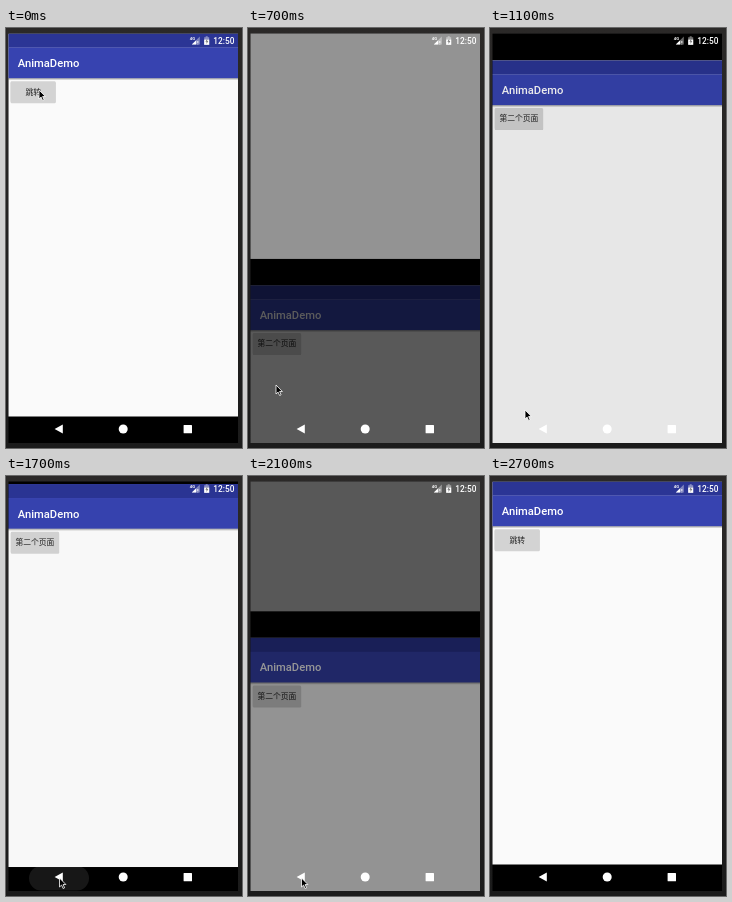
An HTML page that plays this animation: 236x420 px, repeating every 2.8 s.

```html
<!DOCTYPE html>
<html lang="zh">
<head>
<meta charset="utf-8">
<style>
html, body { margin: 0; width: 100%; height: 100%; overflow: hidden; background: #222; }
svg { display: block; width: 236px; height: 420px; }
.title { font: 500 11.2px Roboto, sans-serif; fill: #fff; }
.label { font: 500 7.8px "Noto Sans CJK SC", "Noto Sans CJK", sans-serif; fill: #222; text-anchor: middle; }
.clock { font: 500 8.3px Roboto, sans-serif; fill: #fff; }
.net { font: 700 4.2px Roboto, sans-serif; fill: #fff; }
</style>
</head>
<body>
<svg viewBox="0 0 236 420">
  <defs>
    <linearGradient id="bezel" x2="0" y2="1">
      <stop offset="0" stop-color="#2b2928"/>
      <stop offset="1" stop-color="#1b1b1b"/>
    </linearGradient>
    <linearGradient id="shade" x2="0" y2="1">
      <stop offset="0" stop-opacity=".35"/>
      <stop offset="1" stop-opacity="0"/>
    </linearGradient>
    <clipPath id="screen"><rect x="2.5" y="5.5" width="229.5" height="409.5"/></clipPath>
    <g id="frame">
      <rect x="2" y="5.5" width="231" height="383" fill="#fafafa"/>
      <rect x="2" y="5.5" width="231" height="14.2" fill="#2b3595"/>
      <rect x="2" y="19.5" width="231" height="30.7" fill="#3743b0"/>
      <rect x="2" y="50.2" width="231" height="2.3" fill="url(#shade)"/>
      <text class="title" x="11.8" y="39">AnimaDemo</text>
    </g>
  </defs>
  <rect width="236" height="420" fill="url(#bezel)"/>
  <g clip-path="url(#screen)">
    <rect y="5" width="236" height="411"/>
    <g id="first">
      <use href="#frame"/>
      <rect x="4.6" y="54" width="45.2" height="21.2" rx="1.2" fill-opacity=".16"/>
      <rect x="4.6" y="53.2" width="45" height="21" rx="1.2" fill="#d3d3d3"/>
      <text class="label" x="27.2" y="66.5">跳转</text>
    </g>
    <g id="second">
      <use href="#frame"/>
      <rect x="4.8" y="54" width="48.4" height="21.2" rx="1.2" fill-opacity=".16"/>
      <rect x="4.8" y="53.2" width="48.2" height="21" rx="1.2" fill="#d3d3d3"/>
      <text class="label" x="28.9" y="66.5">第二个页面</text>
    </g>
    <rect id="ripple" x="23" y="390" width="60" height="24.5" rx="12.2" fill="#fff"/>
  </g>
  <g fill="#fff">
    <text class="net" x="183.8" y="11.8">4G</text>
    <path d="M193.8 8.6V16.6H185.8Z" fill-opacity=".4"/>
    <path d="M190.2 12.2V16.6H185.8Z"/>
    <path d="M191.4 13h.9v2h-.9zM191.4 15.7h.9v.9h-.9z"/>
    <path d="M198.2 9.3h1.5v-1h2v1h1.5v7.5h-5z" fill-opacity=".45"/>
    <path d="M198.2 11.6h5v5.2h-5z"/>
    <path d="M201.2 10.8l-1.8 3h1.1v2.2l1.8-3.1h-1.1z" fill="#444" fill-opacity=".7"/>
    <text class="clock" x="207.3" y="16">12:50</text>
    <path d="M48.6 401L56.8 396.4V405.6Z"/>
    <circle cx="117.2" cy="401" r="4.5"/>
    <rect x="177.6" y="397" width="8.4" height="8.2" rx=".5"/>
  </g>
  <path id="pointer" d="M0 0V9L2.1 7.1L3.6 10.5L5.1 9.8L3.6 6.5H6.4Z" stroke="#fff" stroke-width=".8" stroke-linejoin="round"/>
</svg>
<script>
const LOOP = 2800, STEP = 100, HEIGHT = 409.5;
const first = document.getElementById("first");
const second = document.getElementById("second");
const ripple = document.getElementById("ripple");
const pointer = document.getElementById("pointer");

// Each key is [time, value]; values are linear between keys.
const enter = [[274, 0], [700, .426], [1100, .835], [1265, 1]];
const leave = [[1647, 0], [1700, .05], [2100, .424], [2300, .598], [2690, 1]];
const pressed = [[1500, 0], [1700, 1], [2000, 0]];
const pointerX = [[300, 33], [700, 28], [1100, 35], [1500, 53.5]];
const pointerY = [[300, 62], [700, 357], [1100, 382], [1500, 402]];

function at(keys, t) {
  if (t <= keys[0][0]) return keys[0][1];
  for (let i = 1; i < keys.length; i++) {
    const [a, u] = keys[i - 1], [b, v] = keys[i];
    if (t <= b) return u + (v - u) * (t - a) / (b - a);
  }
  return keys[keys.length - 1][1];
}

const ease = x => (1 - Math.cos(Math.PI * x)) / 2;

function place(page, y, shown) {
  page.setAttribute("transform", `translate(0 ${y.toFixed(2)})`);
  page.setAttribute("opacity", shown - .12 * shown * (1 - shown));
}

function draw(t) {
  const p = ease(at(enter, t)) - ease(at(leave, t));
  place(first, -HEIGHT * p, 1 - p);
  place(second, HEIGHT * (1 - p), p);
  ripple.setAttribute("opacity", .09 * at(pressed, t));
  pointer.setAttribute("transform", `translate(${at(pointerX, t)} ${at(pointerY, t)})`);
  pointer.setAttribute("visibility", t < 2700 ? "visible" : "hidden");
}

const start = performance.now();
function tick() {
  const t = (performance.now() - start) % LOOP;
  draw(Math.floor(t / STEP) * STEP);
  requestAnimationFrame(tick);
}
tick();
</script>
</body>
</html>
```
